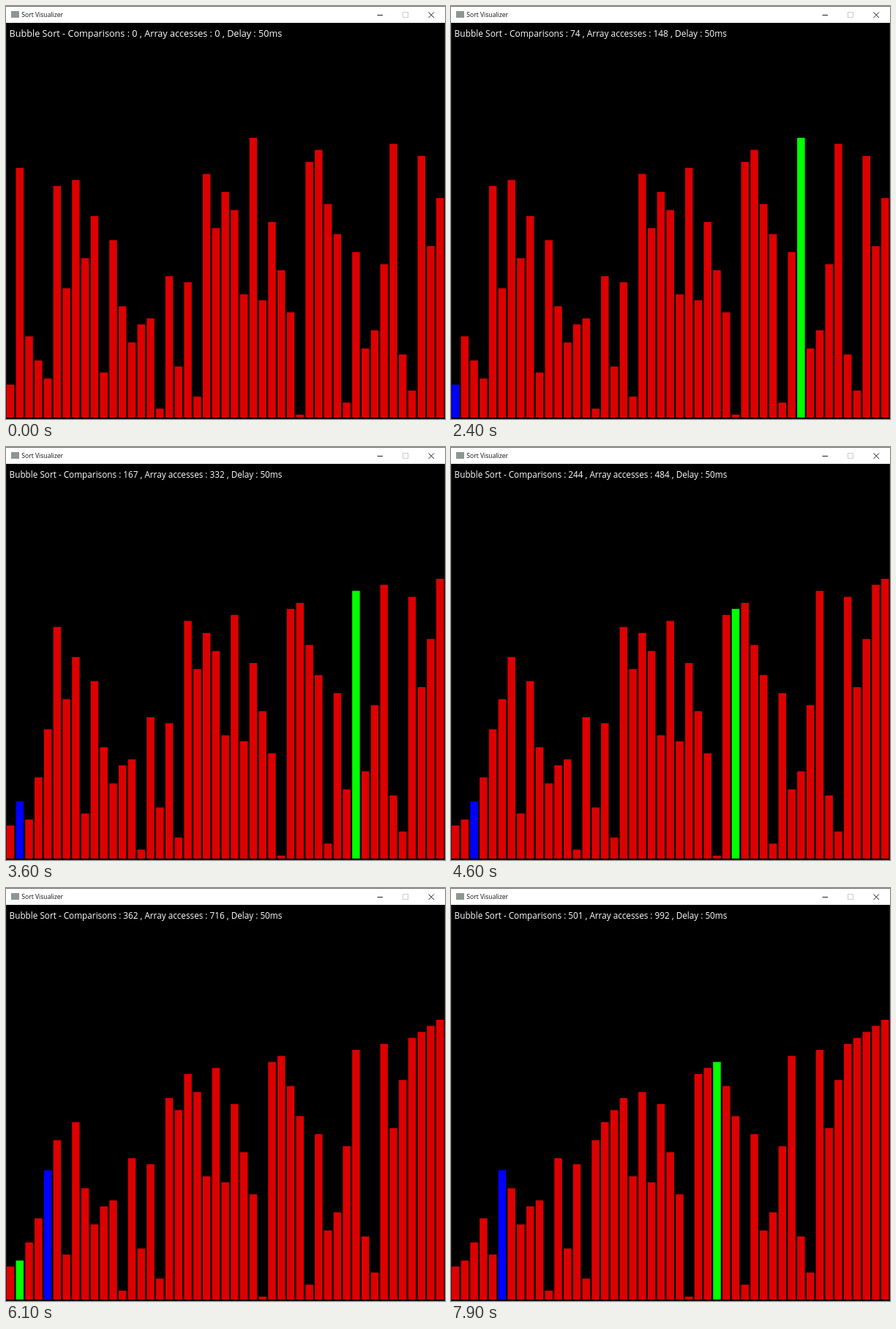
An HTML page with a canvas that plays this animation: 600x564 px, repeating every 8000 ms.

```html
<!DOCTYPE html>
<html lang="en">
<head>
<meta charset="utf-8">
<title>Sort Visualizer</title>
<style>
  html, body { margin: 0; width: 100%; height: 100%; overflow: hidden; background: #000; }
  canvas { display: block; }
</style>
</head>
<body>
<canvas id="stage" width="600" height="564"></canvas>
<script>
const ctx = document.getElementById('stage').getContext('2d');
const LOOP = 8000, FRAME = 100, START = 1427, STEP = 26.05;
const FONT = '"Open Sans", "Noto Sans", sans-serif';
const VALUES = [
  5, 41, 13, 9, 6, 38, 21, 39, 26, 33, 7, 29, 18, 12, 15, 16,
  1, 23, 8, 22, 3, 40, 31, 37, 34, 20, 46, 19, 32, 24, 17, 0,
  42, 44, 35, 30, 2, 27, 11, 14, 25, 45, 10, 4, 43, 28, 36
];
const PITCH = 600 / VALUES.length;

function rect(color, x, y, w, h) {
  ctx.fillStyle = color;
  ctx.fillRect(x, y, w, h);
}

function line(color, ...points) {
  ctx.strokeStyle = color;
  ctx.lineWidth = 1;
  ctx.beginPath();
  for (let i = 0; i < points.length; i += 4) {
    ctx.moveTo(points[i], points[i + 1]);
    ctx.lineTo(points[i + 2], points[i + 3]);
  }
  ctx.stroke();
}

// Bubble sort state after a number of inner-loop steps
function sortState(steps) {
  const bars = [...VALUES];
  let pass = 0, pos = 0;
  for (let s = 0; s < steps; s++) {
    if (pos === bars.length - 1 - pass) { pass++; pos = 0; }
    if (bars[pos] > bars[pos + 1]) {
      [bars[pos], bars[pos + 1]] = [bars[pos + 1], bars[pos]];
    }
    pos++;
  }
  return { bars, pass, pos };
}

function drawWindow() {
  rect('#000', 0, 0, 600, 564);
  rect('#2c2c2a', 0, 23, 0.7, 541);
  rect('#2c2c2a', 599.3, 23, 0.7, 541);
  rect('#fff', 0, 0, 600, 23);
  rect('#4a4a4a', 0, 0, 600, 0.8);
  rect('#8d9690', 7, 7, 11, 9);
  ctx.fontStretch = 'normal';
  ctx.font = `8.6px ${FONT}`;
  ctx.fillStyle = '#111';
  ctx.fillText('Sort Visualizer', 21.3, 15);
  line('#222', 507.5, 12.5, 515, 12.5);
  line('#222', 577.5, 8.5, 585, 16, 585, 8.5, 577.5, 16);
  ctx.strokeStyle = '#ccc';
  ctx.strokeRect(542.5, 8.5, 7, 7);
}

// The status line always spans the same width, so its size follows its length
function drawStatus(text) {
  ctx.fontStretch = 'semi-condensed';
  ctx.font = `500 100px ${FONT}`;
  const size = 37300 / ctx.measureText(text).width;
  ctx.font = `500 ${size}px ${FONT}`;
  ctx.fillStyle = '#fff';
  ctx.fillText(text, 4.6, 42);
}

function draw(time) {
  const t = Math.floor(time % LOOP / FRAME) * FRAME;
  const steps = Math.max(0, Math.floor((t - START) / STEP));
  const { bars, pass, pos } = sortState(steps);
  drawWindow();
  drawStatus(`Bubble Sort - Comparisons : ${2 * steps + pass} , Array accesses : ${4 * steps} , Delay : 50ms`);
  bars.forEach((value, i) => {
    const height = 4 + value * 8.217;
    const color = !steps ? '#dc0000' : i === pos ? '#0f0' : i === pass ? '#00f' : '#dc0000';
    rect(color, 0.8 + i * PITCH, 562 - height, 10.5, height);
  });
}

const begin = performance.now();
function tick() {
  draw(performance.now() - begin);
  requestAnimationFrame(tick);
}
tick();
</script>
</body>
</html>
```
